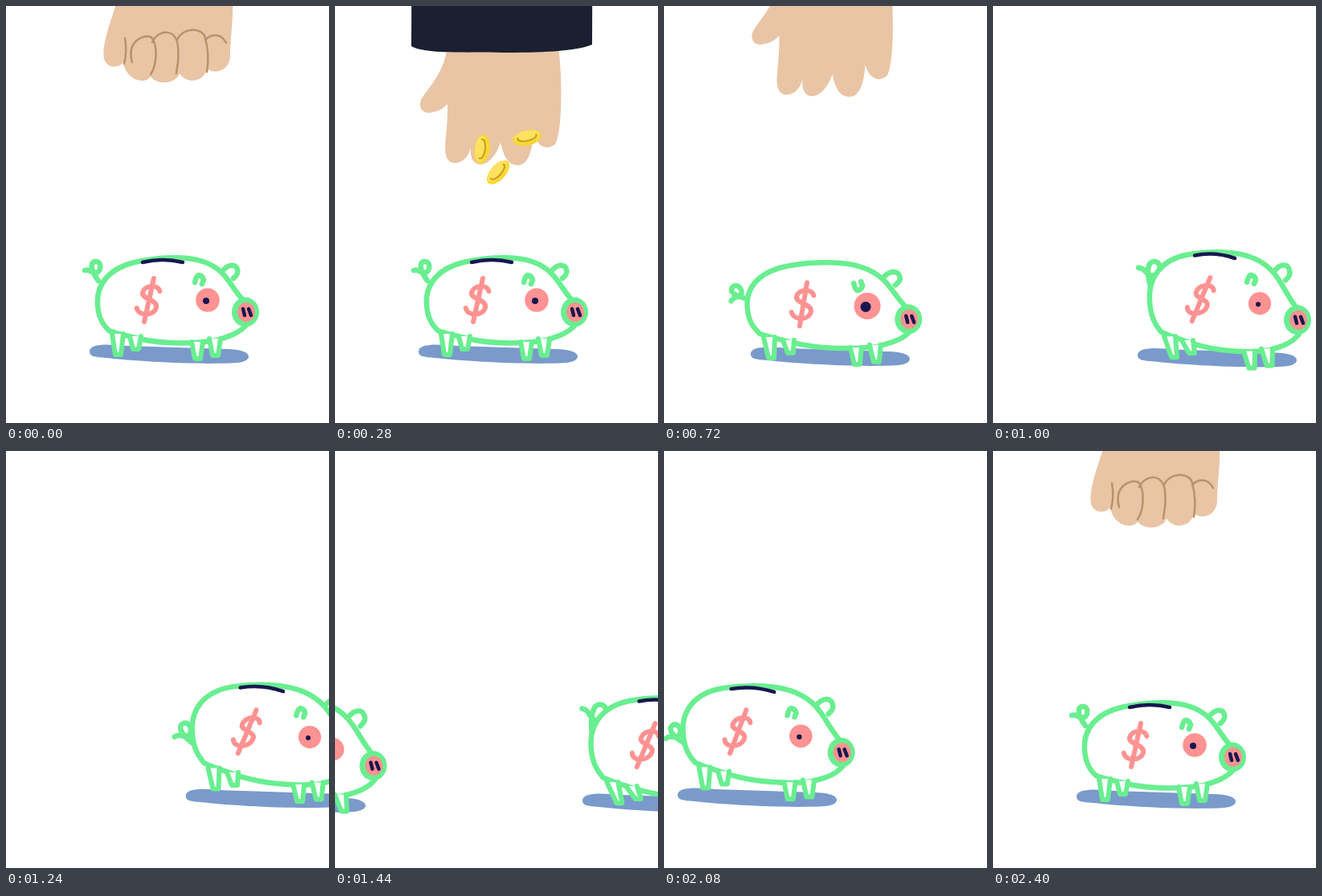
These frames come from a looping animation (402 px wide and 519 px high, 2480 ms). An HTML page with a canvas:

```html
<!DOCTYPE html>
<html lang="en">
<head>
<meta charset="utf-8">
<title>Piggy bank</title>
<style>
html, body { margin: 0; width: 100%; height: 100%; overflow: hidden; background: #fff; }
canvas { display: block; width: 402px; height: 519px; }
</style>
</head>
<body>
<canvas id="stage" width="402" height="519"></canvas>
<script>
const ctx = document.getElementById('stage').getContext('2d');
const LOOP = 2480, STEP = 40, GAP = 468;
const GREEN = '#69ee90', PINK = '#ff9292', NAVY = '#17174f', WHITE = '#fff',
      BLUE = '#7a9acb', SKIN = '#e9c5a5', CREASE = '#b8926b', CLOTH = '#1a2030';

const shapes = {
  body: 'M114 372C112 345 130 326 160 319C190 312 225 311 245 318C275 328 278 348 295 366L300 396C290 408 275 412 262 416C240 420 200 422 165 414C150 410 138 408 128 404C118 394 115 385 114 372Z',
  ear: 'M271 328C278 321 286 321 288 328Q290 333 283 339',
  slot: 'M170 319Q195 313 220 319',
  shadow: 'M104 430C104 419 130 421 152 423L275 427C308 427 309 442 288 444C240 447 160 442 125 438C110 437 104 436 104 430Z',
  tail: 'M0 0C-6 -8 -13 -22 -4 -24C5 -25 4 -10 -4 -10C-10 -10 -10 -15 -17 -13',
  brow: 'M-5 3Q-3 -6 0 -6Q5 -5 6 0L4 5',
  dollar: 'M11 -11C7 -20 -9 -19 -10 -10C-11 -1 11 -1 11 9C11 20 -8 21 -13 10M0 -27L0 27',
  nostrils: 'M-3 -4L-1 4M4 -4L7 4',
  hand: 'M140 50C136 80 122 95 110 112C100 126 110 136 122 132C132 130 136 126 140 122C141 150 135 175 138 185C140 200 162 200 169 177C166 204 194 206 206 170C210 186 214 198 228 198C240 198 246 180 247 158C252 176 264 180 274 172C282 160 284 100 278 50Z',
  fist: 'M139 -8C128 25 119 50 122 66C126 78 140 78 146 70C150 95 175 97 180 88C190 100 212 96 216 84C224 97 246 96 250 78C260 86 280 80 279 60C279 40 283 20 282 -8Z',
  knuckles: 'M148 40Q151 56 147 72M157 70C150 45 170 34 181 39C190 50 187 75 180 85M182 45C190 28 212 28 214 50C216 70 212 78 212 84M213 42C220 26 245 26 248 40C252 55 252 70 250 82M248 42C256 34 268 34 274 46',
  sleeve: 'M96 -220L95 50C112 60 160 57 210 58C250 58 300 57 320 48L321 -220Z'
};
for (const k in shapes) shapes[k] = new Path2D(shapes[k]);

// Every pose is the standing pig, deformed.
const stand = { sx: 1, sy: 1, dx: 0, dy: 0, tilt: 0, swing: 0, slant: 0.22,
  drop: 0, curl: 0, tail: 1, pupil: 4, brow: 1, slot: 4.5 };
const squash = { ...stand, sx: 1.09, dx: -6, dy: 6, tilt: 0.03, swing: 2, slant: 0.17,
  drop: 19, curl: -45, pupil: 6.5, brow: -1, slot: 0 };
const lean = { ...stand, sy: 1.15, dx: 5, dy: 1, tilt: 0.07, swing: 5, slant: 0.42,
  drop: 16, curl: 20, tail: 1.3, pupil: 3 };
const land = { ...lean, sx: 1.07, dx: 7, dy: 2, swing: 8, curl: 30, tail: 1.5 };
const leap = { ...land, sx: 1.09, dx: 4, dy: -13, tilt: 0.1, swing: 1, drop: 59, curl: -30, tail: 1.1 };

const poseKeys = [[0, stand], [600, stand], [680, squash], [760, squash], [1000, lean], [1120, lean],
  [1280, leap], [1440, land], [1600, land], [1800, leap], [2000, leap], [2360, stand], [LOOP, stand]];
const walkKeys = [[0, 0], [705, 0], [1000, 76], [1160, 86], [1440, 204], [1800, 294], [2360, GAP], [LOOP, GAP]];

const mix = (a, b, u) => a + (b - a) * u;
const part = (t, a, b) => Math.max(0, Math.min(1, (t - a) / (b - a)));

function span(keys, t) {
  const i = keys.findIndex(k => k[0] > t);
  const [t0, a] = keys[i - 1], [t1, b] = keys[i];
  return [a, b, part(t, t0, t1)];
}

function poseAt(t) {
  const [a, b, u] = span(poseKeys, t), pose = {};
  for (const k in a) pose[k] = mix(a[k], b[k], u);
  return pose;
}

const hop = (t, a, b, height) => -height * Math.sin(Math.PI * part(t, a, b));

function reach(t) {
  if (t >= 2320) return mix(-215, -58, part(t, 2320, 2400));
  return -58 * (1 - part(t, 60, 240)) - 215 * part(t, 500, 850) ** 2;
}

function paint(path, fill, stroke, width) {
  if (fill) { ctx.fillStyle = fill; ctx.fill(path); }
  if (stroke) { ctx.strokeStyle = stroke; ctx.lineWidth = width; ctx.stroke(path); }
}

// Bends the outline only, so that line weights stay even.
function warp(path, matrix) {
  const out = new Path2D();
  out.addPath(path, matrix);
  return out;
}

function oval(x, y, rx, ry, fill) {
  const path = new Path2D();
  path.ellipse(x, y, rx, ry, 0, 0, 7);
  paint(path, fill);
}

function leg({ x, y }, length, swing) {
  const path = new Path2D();
  path.moveTo(x - 7, y - 3);
  path.lineTo(x - 3 + swing, y + length);
  path.lineTo(x + 4 + swing, y + length);
  path.lineTo(x + 7, y - 3);
  paint(path, WHITE, GREEN, 6);
}

function pig(p, x, y) {
  const m = new DOMMatrix([p.sx, p.tilt, 0, p.sy,
    205 * (1 - p.sx) + p.dx, 366 * (1 - p.sy) + p.dy - 205 * p.tilt]);
  const at = (x, y) => m.transformPoint({ x, y });
  const place = (x, y) => { const q = at(x, y); return new DOMMatrix().translate(q.x, q.y); };

  ctx.save();
  ctx.translate(x, 0);
  paint(warp(shapes.shadow, new DOMMatrix().translate(0, (at(205, 419).y - 419) / 2)), BLUE);
  ctx.translate(0, y);

  const tail = place(115, 342).translate(0, p.drop).rotate(p.curl).scale(p.tail);
  paint(warp(shapes.tail, tail), null, GREEN, 6.5);
  paint(warp(shapes.ear, m), WHITE, GREEN, 6.5);
  paint(warp(shapes.body, m), WHITE, GREEN, 6.5);
  leg(at(139, 411), 23, p.swing);
  leg(at(161, 414), 13, p.swing);
  leg(at(238, 421), 18, p.swing / 2);
  leg(at(260, 417), 18, p.swing / 2);
  paint(warp(shapes.brow, place(240, 341).scale(1, p.brow)), null, GREEN, 6.5);

  const eye = at(251, 366), r = 12 + 0.7 * p.pupil;
  oval(eye.x, eye.y, r, r, PINK);
  oval(eye.x - 2, eye.y + 1, p.pupil, p.pupil, NAVY);

  const snout = at(298, 381);
  oval(snout.x, snout.y, 17, 18.5, GREEN);
  oval(snout.x + 1, snout.y, 11, 12, PINK);
  paint(warp(shapes.nostrils, place(298, 381)), null, NAVY, 4.5);

  const slant = new DOMMatrix([1, 0, -p.slant, 1, 0, 0]);
  paint(warp(shapes.dollar, place(178, 366).multiply(slant)), null, PINK, 6);
  if (p.slot > 0.5) paint(warp(shapes.slot, m), null, NAVY, p.slot);
  ctx.restore();
}

function hand(t) {
  const y = reach(t);
  ctx.save();
  ctx.translate(0, y);
  if (t < 200 || t >= 2320) {
    ctx.translate(0, 58);
    paint(shapes.fist, SKIN);
    paint(shapes.knuckles, null, CREASE, 2.5);
    ctx.translate(0, -58);
  } else {
    ctx.translate(-0.04 * y, 0);
    paint(shapes.hand, SKIN);
  }
  paint(shapes.sleeve, CLOTH);
  ctx.restore();
}

function coin(x, y, tilt) {
  ctx.save();
  ctx.translate(x, y);
  ctx.rotate(tilt * Math.PI / 180);
  oval(0, 0, 9.5, 18, '#fbd72c');
  oval(-1.5, 0, 7.5, 16, '#ffe160');
  const rim = new Path2D();
  rim.ellipse(-1, 0, 5, 12, 0, -1.7, 1.7);
  paint(rim, null, '#c9a112', 2.2);
  ctx.restore();
}

function coins(t) {
  const d = t - 280, u = part(d, 0, 240);
  if (d < -80 || d > 320) return;
  const fall = 0.3 * d + 0.0012 * d * d;
  ctx.save();
  ctx.beginPath();
  ctx.rect(0, 0, 402, 317);
  ctx.clip();
  for (const [x, y, tilt] of [[183, 178, 8], [239, 164, 78], [203, 207, 42]])
    coin(mix(x, 195, u), y + fall, mix(tilt, 20, u));
  ctx.restore();
}

function draw(now) {
  const t = Math.floor(now % LOOP / STEP) * STEP;
  ctx.fillStyle = WHITE;
  ctx.fillRect(0, 0, 402, 519);
  ctx.lineCap = ctx.lineJoin = 'round';
  const pose = poseAt(t), x = mix(...span(walkKeys, t));
  const y = hop(t, 1160, 1440, 6) + hop(t, 1800, 2120, 12);
  pig(pose, x - GAP, y);
  pig(pose, x, y);
  hand(t);
  coins(t);
}

const start = performance.now();
function tick() {
  draw(performance.now() - start);
  requestAnimationFrame(tick);
}
tick();
</script>
</body>
</html>
```
